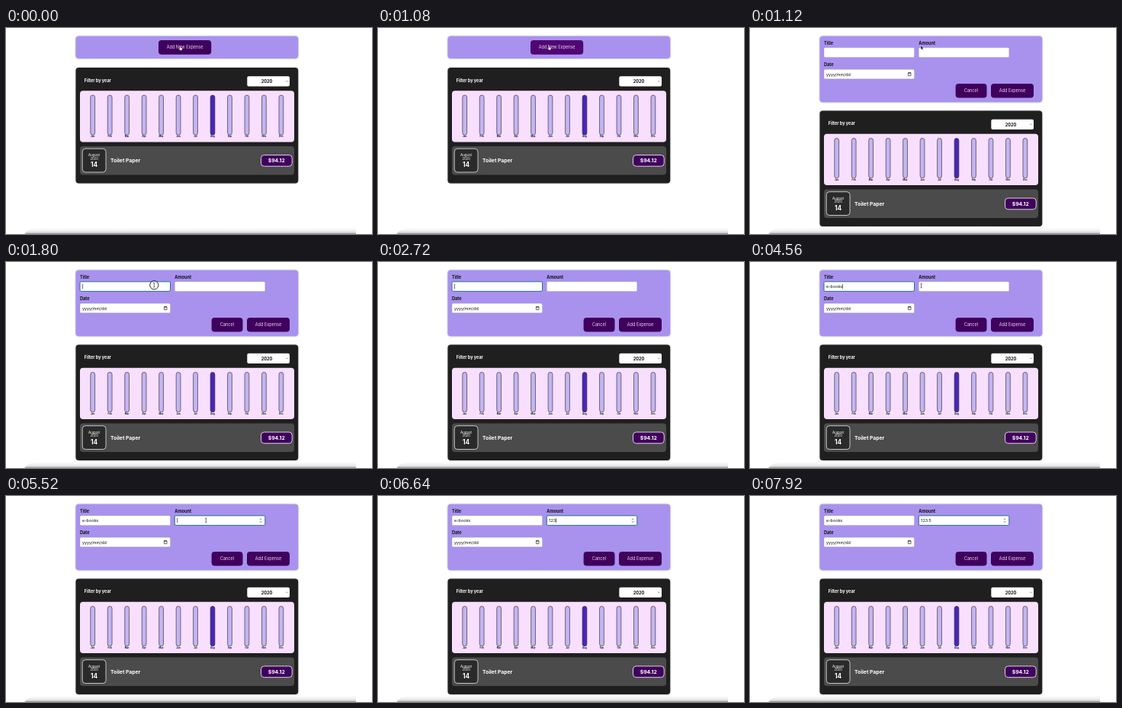
Recreate the animation shown at these times as an HTML page. Size 480 px wide and 270 px high, loop 8000 ms.

```html
<!DOCTYPE html>
<html lang="en">
<head>
<meta charset="utf-8">
<title>Expense form</title>
<style>
  html, body { margin: 0; width: 100%; height: 100%; overflow: hidden; background: #fff; }
  svg { display: block; width: 480px; height: 270px; }
  text { font-family: Inter, Roboto, sans-serif; }
  .bold { font-weight: 700; }
  .mid { text-anchor: middle; }
  .card { filter: drop-shadow(0 .6px 1.2px rgba(0, 0, 0, .35)); }
</style>
</head>
<body>
<svg id="stage" viewBox="0 0 480 270" xmlns="http://www.w3.org/2000/svg"></svg>
<script>
const LOOP = 8000, OPEN_AT = 1120, CARD_SHIFT = 56.5;
const PLUM = '#40005d', PLUM_HOVER = '#510674', LILAC = '#a892ee';

const rect = (x, y, w, h, r, fill, extra = '') =>
  `<rect x="${x}" y="${y}" width="${w}" height="${h}" rx="${r}" fill="${fill}" ${extra}/>`;
const text = (x, y, size, fill, str, cls = '', extra = '') =>
  `<text x="${x}" y="${y}" font-size="${size}" fill="${fill}" class="${cls}" ${extra}>${str}</text>`;
const button = (x, y, w, h, label, id = '') =>
  rect(x, y, w, h, 4, PLUM, id && `id="${id}"`) +
  text(x + w / 2, y + h / 2 + 2, 5.5, '#ead9f2', label, 'mid');
const field = (x, y, id) =>
  rect(x, y, 118.5, 12.6, 1.5, '#fff', `id="${id}" stroke="#8f84b5" stroke-width=".3"`);

const months = 'Jan Feb Mar Apr May Jun Jul Aug Sep Oct Nov Dec'.split(' ');
const bars = months.map((name, i) => {
  const x = 113.7 + i * 22.47;
  return rect(x - 2.9, 88, 5.8, 52.3, 2.9, name === 'Aug' ? '#4826b9' : '#c3b4f3',
    'stroke="#313131" stroke-width=".65"') +
    text(x, 143.4, 2.9, '#111', name, 'mid bold');
}).join('');

const card = `<g id="card">
  ${rect(91.5, 52, 291.7, 151.5, 4, '#1f1f1f', 'class="card"')}
  ${text(102.8, 70.5, 5.5, '#fff', 'Filter by year', 'bold')}
  ${rect(316.3, 63.2, 55.7, 13.2, 2, '#fff')}
  ${text(342, 72, 5.6, '#111', '2020', 'mid bold')}
  <path d="M367.3 69.2l1 1.2 1-1.2" fill="none" stroke="#333" stroke-width=".5"/>
  ${rect(97, 82.2, 281, 67.3, 4, '#f8dffe')}
  ${bars}
  ${rect(97, 155, 281, 37.4, 4, '#4b4b4b')}
  ${rect(100.2, 158.2, 30.8, 30.8, 4, '#2a2a2a', 'stroke="#fff" stroke-width=".7"')}
  ${text(115.6, 168, 4.5, '#fff', 'August', 'mid')}
  ${text(115.6, 172.8, 4.2, '#fff', '2020', 'mid')}
  ${text(115.6, 182.2, 8.4, '#fff', '14', 'mid bold')}
  ${text(137, 176.2, 6.8, '#fff', 'Toilet Paper', 'bold')}
  ${rect(334.5, 166.5, 40.7, 14.7, 4, PLUM, 'stroke="#fff" stroke-width=".8"')}
  ${text(354.8, 176.4, 6.8, '#fff', '$94.12', 'mid bold')}
</g>`;

const closedPanel = `<g id="closed">${button(200, 16, 69.2, 18.7, 'Add New Expense', 'opener')}</g>`;

const form = `<g id="form">
  ${text(97, 21.7, 5.6, '#111', 'Title', 'bold')}
  ${text(221.3, 21.7, 5.6, '#111', 'Amount', 'bold')}
  ${text(97, 49.9, 5.6, '#111', 'Date', 'bold')}
  ${field(97, 25.8, 'titleBox')}${field(221.3, 25.8, 'amountBox')}${field(97, 54.2, 'dateBox')}
  ${text(100, 34.2, 5.4, '#111', '', '', 'id="titleText"')}
  ${text(224.3, 34.2, 5.4, '#111', '', '', 'id="amountText"')}
  ${text(100, 62.6, 5.4, '#111', 'yyyy/mm/dd')}
  <path d="M207.4 58.6h3.6v4h-3.6zM207.4 59.2h3.6M208.2 57.8v.8M210.2 57.8v.8" fill="none" stroke="#111" stroke-width=".6"/>
  <path id="spinner" d="M332.9 31.2l1.2-1.6 1.2 1.6M332.9 33l1.2 1.6 1.2-1.6" fill="none" stroke="#555" stroke-width=".6"/>
  <rect id="caret" y="29" width=".6" height="6.2" fill="#111"/>
  ${button(269.6, 73, 40.9, 18.4, 'Cancel')}${button(316, 73, 56, 18.4, 'Add Expense')}
</g>`;

const pointer = `<g id="pointer">
  <circle id="ring" r="5.6" fill="#fff" fill-opacity=".5" stroke="#111" stroke-width=".9"/>
  <path id="hand" d="M-.6-2.6q.6-.7 1.1 0v2l1.9.6q.5 1.7-.4 3h-2.4l-1.8-2.2q.5-.8 1.6 0z" fill="#fff" stroke="#222" stroke-width=".4"/>
  <path id="arrow" d="M0-2.6v5.2l1.2-1.1.8 1.8.9-.4-.8-1.7h1.6z" fill="#111" stroke="#fff" stroke-width=".35"/>
  <path id="beam" d="M-1.1-2.9q1.1 0 1.1.7 0-.7 1.1-.7M0-2.2v4.4M-1.1 2.9q1.1 0 1.1-.7 0 .7 1.1.7" fill="none" stroke="#111" stroke-width=".6"/>
</g>`;

const stage = document.getElementById('stage');
stage.innerHTML = `
  <defs>
    <linearGradient id="fade" x2="0" y2="1">
      <stop offset="0" stop-color="#fff"/><stop offset=".55" stop-color="#eee"/><stop offset="1" stop-color="#bbb"/>
    </linearGradient>
  </defs>
  <path d="M24 270Q30 261.5 48 261.5H459V270z" fill="url(#fade)"/>
  <path d="M26 269.6H459" stroke="#888" stroke-width=".8"/>
  ${rect(91.5, 10.8, 291.7, 29.2, 4, LILAC, 'id="panel" class="card"')}
  ${closedPanel}${form}${card}${pointer}`;

const el = Object.fromEntries([...stage.querySelectorAll('[id]')].map(node => [node.id, node]));
const show = (node, on) => node.setAttribute('visibility', on ? 'inherit' : 'hidden');
const set = (node, attrs) => Object.entries(attrs).forEach(([k, v]) => node.setAttribute(k, v));
const within = (t, from, to) => t >= from && t < to;

// Keystroke times, one per character
const typing = {
  title: ['e-books', [2760, 3120, 3480, 3680, 3800, 3960, 4160]],
  amount: ['123.5', [6000, 6240, 6400, 7360, 7920]],
};
const typed = ([str, times], t) => str.slice(0, times.filter(at => at <= t).length);

// Pointer stops: time, x, y
const path = [
  [0, 228.6, 26.3], [760, 228.6, 26.3], [1000, 225.6, 26.3], [1120, 224, 25.6], [1440, 224, 25.6],
  [1720, 194.3, 30.3], [4320, 194.3, 30.3], [4840, 262.3, 31.8], [LOOP, 262.3, 31.8],
];
function pointerAt(t) {
  const i = path.findIndex(stop => stop[0] > t);
  const [t0, x0, y0] = path[i - 1], [t1, x1, y1] = path[i];
  const p = (t - t0) / (t1 - t0), ease = p * p * (3 - 2 * p);
  return [x0 + (x1 - x0) * ease, y0 + (y1 - y0) * ease];
}

function focusBox(box, on) {
  set(box, on ? { stroke: '#17657f', 'stroke-width': .9 } : { stroke: '#8f84b5', 'stroke-width': .3 });
}

function drawCaret(t, focus) {
  show(el.caret, false);
  if (!focus) return;
  const label = el[focus + 'Text'];
  const start = focus === 'title' ? 1720 : 5240;
  const last = Math.max(start, ...typing[focus][1].filter(at => at <= t));
  const left = focus === 'title' ? 100 : 224.3;
  el.caret.setAttribute('x', left + (label.textContent ? label.getComputedTextLength() : 0));
  show(el.caret, (t - last) % 1000 < 480 && t - last > 40);
}

function draw(t) {
  const open = t >= OPEN_AT;
  const focus = within(t, 1720, 5240) ? 'title' : t >= 5240 ? 'amount' : '';
  el.panel.setAttribute('height', open ? 86.4 : 29.2);
  el.card.setAttribute('transform', `translate(0 ${open ? CARD_SHIFT : 0})`);
  show(el.closed, !open);
  show(el.form, open);
  el.opener.setAttribute('fill', t >= 760 ? PLUM_HOVER : PLUM);

  el.titleText.textContent = typed(typing.title, t);
  el.amountText.textContent = typed(typing.amount, t);
  focusBox(el.titleBox, focus === 'title');
  focusBox(el.amountBox, focus === 'amount');
  show(el.spinner, open && (focus === 'amount' || within(t, 4760, 5240)));
  drawCaret(t, focus);

  const [x, y] = pointerAt(t);
  const overField = y > 26 && (x < 215.5 || x > 221);
  el.pointer.setAttribute('transform', `translate(${x} ${y})`);
  show(el.pointer, t < 2720 || within(t, 4320, 6000));
  show(el.hand, !open);
  show(el.arrow, open && !overField);
  show(el.beam, open && overField);
  show(el.ring, within(t, 1720, 1880) || within(t, 5240, 5440));
}

function frame(now) {
  draw(now % LOOP);
  requestAnimationFrame(frame);
}
draw(0);
requestAnimationFrame(frame);
</script>
</body>
</html>
```
